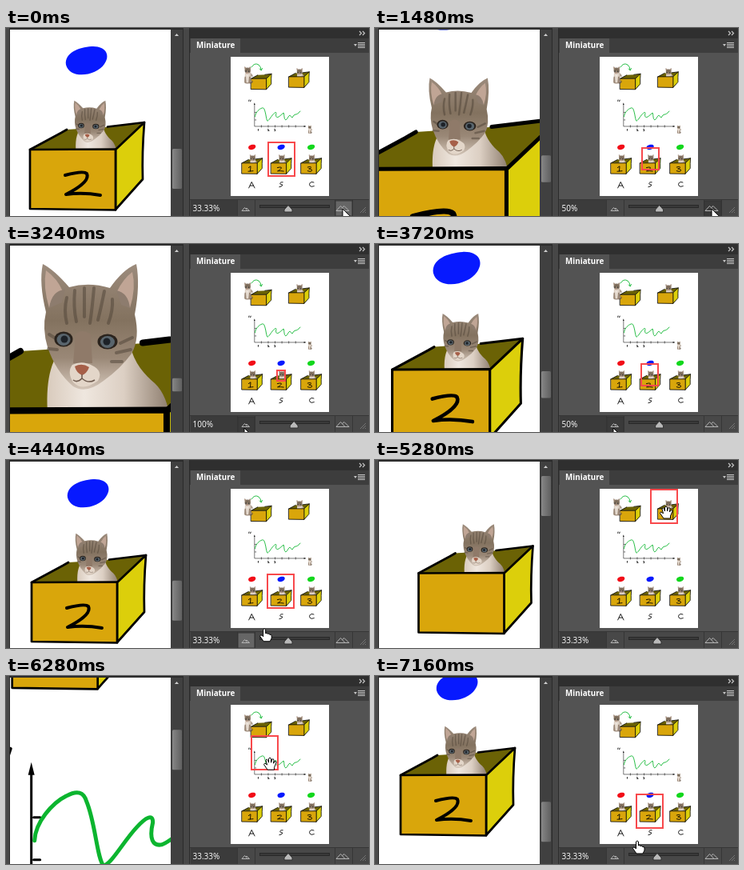
An HTML page for the animation above (7.2 s loop, 454x235 px).

```html
<!DOCTYPE html>
<html lang="en">
<head>
<meta charset="utf-8">
<title>Zooming and panning with a thumbnail panel</title>
<style>
html, body { margin: 0; width: 100%; height: 100%; overflow: hidden; background: #535353; }
svg { display: block; }
#stage { width: 100vw; height: 100vh; }
text { font-family: "Open Sans", "Noto Sans", sans-serif; fill: #fff; }
.ink { stroke: #000; stroke-width: var(--ink); stroke-linecap: round; stroke-linejoin: round; }
.pen { fill: none; stroke: #000; stroke-width: var(--pen); stroke-linecap: round; stroke-linejoin: round; }
.green { fill: none; stroke: #0cb52f; stroke-width: 5; stroke-linecap: round; stroke-linejoin: round; }
.big { --ink: 2.7; --pen: 4; }
.mini { --ink: 4.5; --pen: 5; }
.cursor { fill: #fff; stroke: #000; stroke-width: 1; stroke-linejoin: round; }
</style>
</head>
<body>
<svg id="stage" viewBox="0 0 454 235">
  <defs>
    <linearGradient id="fur" x1="0" y1="0" x2="0" y2="1">
      <stop offset="0" stop-color="#9c8b7c"/><stop offset=".45" stop-color="#83725f"/>
      <stop offset=".75" stop-color="#9a8877"/><stop offset="1" stop-color="#d3c5b8"/>
    </linearGradient>
    <linearGradient id="chest">
      <stop offset="0" stop-color="#d9cbbd"/><stop offset=".3" stop-color="#efe7df"/>
      <stop offset=".62" stop-color="#dccfc3"/><stop offset="1" stop-color="#8b7b6c"/>
    </linearGradient>
    <linearGradient id="bar">
      <stop offset="0" stop-color="#868686"/><stop offset="1" stop-color="#606060"/>
    </linearGradient>
    <g id="cat">
      <path fill="url(#chest)" d="M53 222C49 180 53 148 70 130L155 125C160 148 174 163 186 173Q202 188 206 222Z"/>
      <path fill="url(#fur)" d="M46 24Q60 31 79 53Q104 46 130 54Q146 31 163 24Q168 50 161 87Q168 117 157 136Q143 155 122 170Q100 187 84 177Q62 158 52 128Q45 105 50 84Q41 48 46 24Z"/>
      <path fill="#c0a595" d="M50 32Q64 42 71 58Q59 66 54 79Q46 52 50 32ZM158 34Q163 54 155 79Q149 66 139 58Q147 42 158 34Z"/>
      <path fill="#8d7c6e" d="M54 79Q57 57 74 56L70 72ZM155 79Q153 60 138 57L144 75Z"/>
      <path fill="none" stroke="#4f4237" stroke-width="4" stroke-linecap="round" opacity=".5" d="M86 57Q84 78 88 96M98 54V90M110 54Q108 78 105 98M123 58Q119 78 115 94M76 66Q72 82 76 98M133 68Q134 82 128 98M54 112L62 117M53 130L64 131M143 123L158 116M138 135L156 131M132 146L145 146"/>
      <path fill="#8f7a69" d="M87 112Q95 104 106 112L108 148L84 148Z"/>
      <path fill="#e3d6c9" d="M83 150Q95 144 108 151Q122 158 115 170Q96 184 84 172Q76 159 83 150Z"/>
      <g fill="#2a231d"><ellipse cx="72" cy="118" rx="11.500" ry="9.500"/><ellipse cx="127" cy="121" rx="12.500" ry="9.500"/></g>
      <g fill="#59656d"><ellipse cx="72" cy="118.500" rx="8.500" ry="7.500"/><ellipse cx="127" cy="121.500" rx="9" ry="7.500"/></g>
      <g fill="#1d2228"><circle cx="73" cy="118" r="4.500"/><circle cx="126" cy="121" r="4.500"/></g>
      <path fill="#a65f48" d="M86 152Q95 147 104 153Q101 161 95 163Q88 160 86 152Z"/>
      <path fill="none" stroke="#6d594d" stroke-width="1.500" d="M95 162V167Q89 173 84 169M95 167Q103 174 111 169"/>
    </g>
    <g id="catInBox" transform="translate(70 82.667) scale(.33333)"><use href="#cat"/></g>
    <g id="sittingCat">
      <path fill="#9b8878" d="M15 52Q1 80 4 112Q4 124 24 123L48 122Q58 116 51 94Q49 68 40 50Z"/>
      <path fill="#e6dbd0" d="M18 52Q12 78 18 116L32 117Q39 78 35 54Z"/>
      <path fill="none" stroke="#5f5145" stroke-width="6" stroke-linecap="round" d="M45 119Q62 120 59 104"/>
      <g transform="translate(-11 -6) scale(.36)"><use href="#cat"/></g>
    </g>
    <g id="inside">
      <path fill="#6b6205" d="M30 152L76 127L138 123L173 118L137 152Z"/>
      <path class="ink" fill="none" d="M30 152L69 131L76 127M127 123.500L173 118"/>
    </g>
    <g id="walls" class="ink">
      <path fill="#dccf0b" d="M137 152L173 118Q170 156 171 189L137 227Z"/>
      <path fill="#d9a60b" d="M30 152L137 151.500V227.500L30 226Z"/>
    </g>
    <g id="boxedCat"><use href="#inside"/><use href="#catInBox"/><use href="#walls"/></g>
    <path id="ball" d="M75 46C73 31 91 24 107 23C125 22 131 34 123 45C113 60 80 65 75 46Z"/>

    <g id="doc">
      <rect width="689" height="975" fill="#fff"/>
      <g transform="translate(113 1)"><use href="#inside"/><use href="#walls"/></g>
      <g transform="translate(92 64)"><use href="#sittingCat"/></g>
      <path class="green" d="M145 73Q168 38 196 56Q212 69 214 94M203 84L214 95L221 81"/>
      <use href="#boxedCat" x="377.500" y="-12.500"/>

      <g transform="translate(135 211)">
        <path class="pen" style="stroke-width:3" d="M32 120V276H386M35 178H43M35 231H43M80 269V282M128 269V282M176 269V282M224 269V282M272 269V282M320 269V282"/>
        <path d="M32 109L28 125H36ZM394 276L378 271V281Z"/>
        <path class="pen" d="M6 92L3 101M-6 91L-8 99M58 296V305M125 297Q136 294 126 306H134M172 296Q184 298 175 302Q185 306 173 308"/>
        <path class="green" d="M36 207C37 184 58 160 76 151Q96 140 101 158C112 184 114 228 122 238C132 237 147 208 164 190C175 178 184 173 184 184C179 205 184 214 195 212Q207 208 235 181C241 192 237 226 251 231C264 225 268 202 279 198Q286 207 296 215Q306 194 319 192Q329 196 352 170"/>
      </g>
      <g transform="translate(541 479) scale(.47)"><use href="#sittingCat"/></g>

      <g transform="translate(49 592)">
        <use href="#ball" fill="#f20d17"/><use href="#boxedCat"/>
        <path class="pen" d="M76 184L91 174L88 209M74 210L108 207"/>
        <path class="pen" d="M78 326L98 284L119 326M87 310H111"/>
      </g>
      <g transform="translate(253 592)">
        <use href="#ball" fill="#0719ff"/><use href="#boxedCat"/>
        <path class="pen" d="M74 184Q97 178 101 182C105 190 91 200 75 208Q96 205 118 209"/>
        <path class="pen" d="M112 286Q92 283 93 297Q96 302 110 304Q111 316 88 319"/>
      </g>
      <g transform="translate(463 592)">
        <use href="#ball" fill="#12d71c"/><use href="#boxedCat"/>
        <path class="pen" d="M76 181Q103 172 99 184Q94 193 84 192Q112 193 104 207Q94 215 76 207"/>
        <path class="pen" d="M119 287Q93 278 89 300Q91 325 121 313"/>
      </g>
    </g>
    <clipPath id="page"><rect x="281" y="36" width="123" height="174"/></clipPath>
  </defs>

  <rect width="454" height="235" fill="#535353"/>
  <rect width="230" height="235" fill="#2b2b2b"/>
  <rect width="4" height="235" fill="#4a4a4a"/>
  <svg x="5" y="2" width="201" height="233">
    <rect width="201" height="233" fill="#fff"/>
    <g id="view" class="big"><use href="#doc"/></g>
  </svg>
  <rect x="206" y="2" width="15" height="233" fill="#404040"/>
  <path d="M211 10L213.500 7L216 10Z" fill="#d0d0d0"/>
  <rect id="scroll" x="208" width="12" rx="1.500" fill="url(#bar)"/>
  <rect x="222" width="7" height="235" fill="#474747"/>

  <rect x="230" width="224" height="13" fill="#2f2f2f"/>
  <rect x="230" y="13" width="224" height="18" fill="#3d3d3d"/>
  <rect x="231" y="13" width="62" height="19" fill="#535353"/>
  <text x="238" y="25" font-size="9.800" font-weight="700">Miniature</text>
  <path d="M442 4L444.500 6.500L442 9M446 4L448.500 6.500L446 9" fill="none" stroke="#c4c4c4" stroke-width="1.200"/>
  <path d="M435 20H439L437 23ZM440 18H449V19H440ZM440 20H449V21H440ZM440 22H449V23H440ZM440 24H449V25H440Z" fill="#c4c4c4"/>
  <g clip-path="url(#page)"><g class="mini" transform="translate(281 36) scale(.178571)"><use href="#doc"/></g></g>
  <rect id="frame" fill="none" stroke="#f8494c" stroke-width="2"/>

  <rect x="230" y="214" width="224" height="21" fill="#484848"/>
  <rect x="231" y="215" width="58" height="20" fill="#3b3b3b"/>
  <path d="M230 214.500H454M289.500 215V235M311.500 215V235M411.500 215V235M433.500 215V235" stroke="#363636"/>
  <rect id="outGlow" x="290" y="216" width="21" height="19" stroke="#333"/>
  <rect id="inGlow" x="412" y="216" width="21" height="19" stroke="#333"/>
  <text id="percent" x="233.500" y="228.500" font-size="10"></text>
  <path fill="none" stroke="#b4b4b4" d="M295 228.500L298.500 224.500L302 228.500M300 226L301 225L304.500 228.500H295M413 228.500L418.500 222.500L424 228.500M420.500 224.500L423 222.500L429 228.500H413"/>
  <rect x="317.500" y="221.500" width="87" height="3" fill="#393939" stroke="#292929"/>
  <path id="handle" d="M0 221.500L5 227V230H-5V227Z" fill="#b9b9b9" stroke="#303030"/>
  <path d="M443 231L450 224M446 231L450 227M449 231L450 230" stroke="#757575"/>

  <g id="pointer" class="cursor">
    <path id="arrow" d="M0 0V14L3.300 11L6 17L8.500 16L6 10.200H10.500Z"/>
    <path id="finger" d="M-1.500 1Q0 -1 1.500 1V6Q3 5 4 6.500Q6 5.500 6.500 7.500Q9 7 9 9V12L7 16H-1L-5.500 9.500Q-5 7 -3 8.500L-1.500 10Z"/>
    <path id="hand" d="M-3 8L-7.500 1.500Q-7 -1 -5 .5L-3.500 2L-5 -4Q-4 -6.500 -2.500 -4L-1.500 -1V-6Q0 -8 1.500 -6V-1L2.500 -5Q4.500 -6.500 5 -4L4.500 0L6 -2.500Q8 -3 8 -1L5.500 5V8Z"/>
  </g>
</svg>

<script>
const LOOP = 7200, THUMB = 5.6, ZOOM_TIME = 120;
const $ = id => document.getElementById(id);

// [click time, zoom relative to 33.33 %]
const zooms = [[1040, 1.5], [1392, 2], [1640, 3], [1800, 6], [1920, 9], [2040, 12],
  [2840, 9], [2980, 6], [3100, 3], [3280, 2], [3400, 1.5], [3640, 1]];

// [time, x, y]: view origin in document units, pointer on the stage
const camera = [[0, 258, 594], [3280, 258, 594], [3760, 256, 593], [4600, 256, 593],
  [4760, 291, 450], [5000, 405, 130], [5240, 358, 0], [5560, 358, 0], [6000, 95, 0],
  [6200, 95, 0], [6280, 140, 213], [6640, 256, 630], [6760, 256, 622]];
const pointer = [[0, 421, 226], [2170, 421, 226], [2320, 298, 230], [4040, 298, 230],
  [4400, 322, 211], [4440, 323, 211], [4600, 349, 172], [4760, 356, 146], [5000, 376, 88],
  [5240, 364, 65], [5560, 364, 65], [6000, 321, 71], [6200, 321, 71], [6280, 330, 109],
  [6640, 350, 182], [6760, 350, 181], [6920, 350, 181], [7160, 328, 206]];

const clamp = v => Math.max(0, Math.min(1, v));
const mix = (a, b, p) => a + (b - a) * p;

function along(keys, t) {
  const next = keys.findIndex(k => k[0] > t);
  if (next < 0) return keys[keys.length - 1].slice(1);
  const a = keys[next - 1], b = keys[next], p = (t - a[0]) / (b[0] - a[0]);
  return [mix(a[1], b[1], p), mix(a[2], b[2], p)];
}

function zoomAt(t) {
  let live = 1, settled = 1;
  for (const [start, target] of zooms) {
    if (t < start) break;
    const p = clamp((t - start) / ZOOM_TIME);
    live = settled * (target / settled) ** p;
    if (p === 1) settled = target;
  }
  return { live, settled };
}

function set(id, attributes) {
  for (const name in attributes) $(id).setAttribute(name, attributes[name]);
}

function draw(t) {
  const { live, settled } = zoomAt(t);
  const [baseX, baseY] = along(camera, t);
  const origin = z => [baseX + 100 * (1 - 1 / z), baseY + 121.5 * (1 - 1 / z)];

  const [x, y] = origin(live);
  set("view", { transform: `scale(${live}) translate(${-x} ${-y})` });

  const [fx, fy] = origin(settled);
  set("frame", {
    x: Math.floor(282 + fx / THUMB), y: Math.round(37 + fy / THUMB),
    width: Math.round(35.5 / settled - 2.2), height: Math.round(44.3 / settled - 2.2)
  });
  const bar = Math.max(10, 50 / settled);
  set("scroll", { y: 45 + baseY * .2205 - bar / 2, height: bar });
  set("handle", { transform: `translate(${353 + 6.5 * Math.log(settled)} 0)` });
  $("percent").textContent = +(settled * 100 / 3).toFixed(2) + "%";

  const pressed = t >= 1040 && t < 2120 || t >= 2840 && t < 3760;
  const fill = pressed ? "#3a3a3a" : "#666";
  set("inGlow", { fill, opacity: 1 - clamp((t - 2170) / 120) });
  set("outGlow", { fill, opacity: clamp((t - 2500) / 100) * (1 - clamp((t - 4460) / 120)) });

  const [px, py] = along(pointer, t);
  set("pointer", { transform: `translate(${px} ${py})` });
  const shape = t < 4240 ? "arrow" : t >= 4560 && t < 7000 ? "hand" : "finger";
  for (const id of ["arrow", "finger", "hand"])
    set(id, { visibility: id === shape ? "visible" : "hidden" });
}

const begin = performance.now();
function tick() {
  draw((performance.now() - begin) % LOOP);
  requestAnimationFrame(tick);
}
tick();
</script>
</body>
</html>
```
